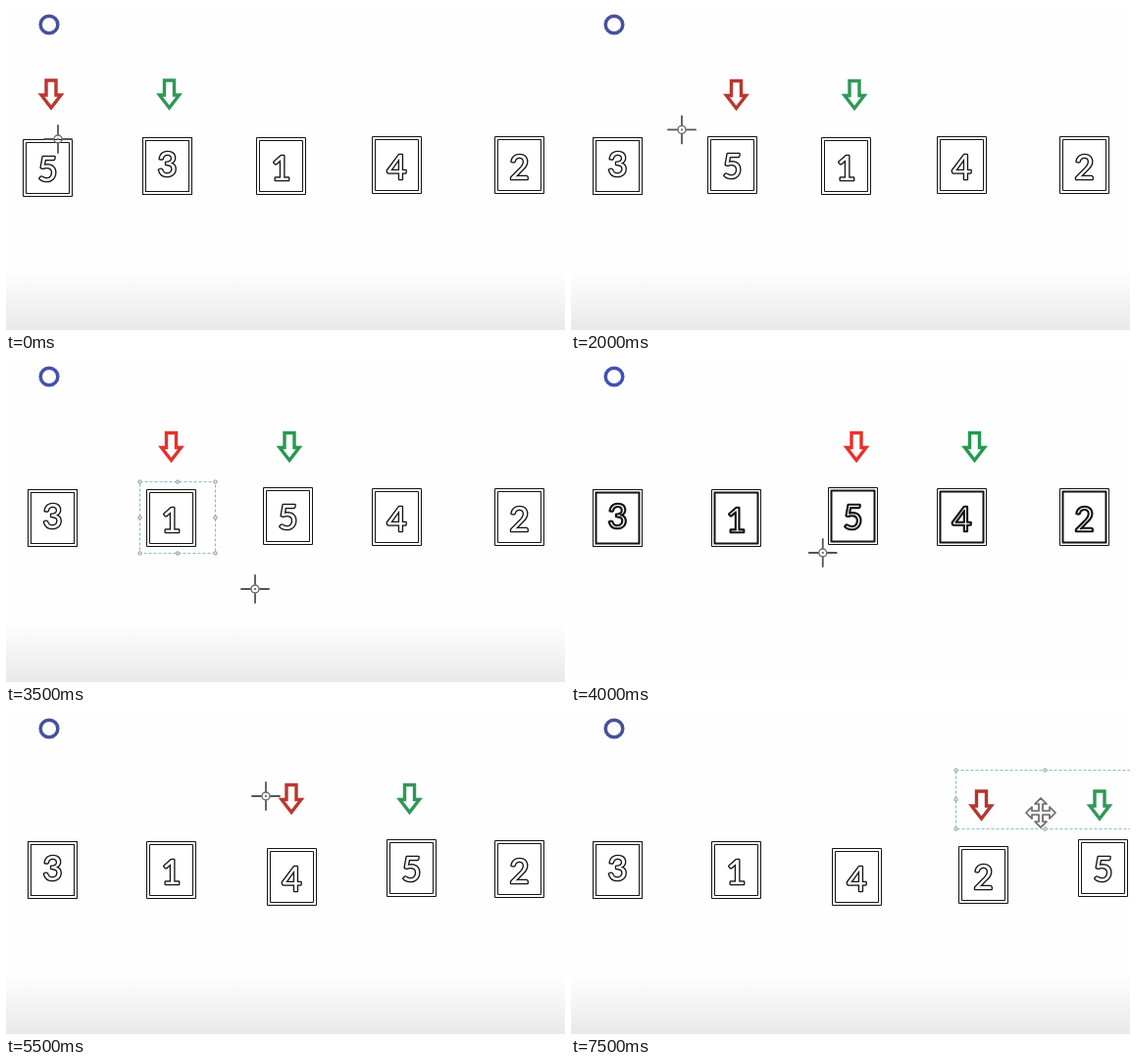
Animation of 570x331 px, one loop 8000 ms. Source, as an HTML page with a canvas:

```html
<!DOCTYPE html>
<html lang="en">
<head>
<meta charset="utf-8">
<title>Sorting cards</title>
<style>
html, body { margin: 0; width: 100%; height: 100%; overflow: hidden; background: #fefefe; }
canvas { display: block; width: 570px; height: 331px; }
</style>
</head>
<body>
<canvas id="stage" width="570" height="331"></canvas>
<script>
const ctx = document.getElementById('stage').getContext('2d');
const STEP = 500, PHASES = 4;
const W = 51, H = 59;

// One pass: lift a card, slide the 5 over, drop the card, move the arrows on
const passes = [
  { digit: '3', dy: 27.5, home: [139, 134], lift: [61, 250], rest: [22, 134], arrow: [46, 0] },
  { digit: '1', dy: 31.5, home: [255, 134], lift: [169, 255], rest: [143, 134], arrow: [168.5, 0.5], keeps: 'card' },
  { digit: '4', dy: 31.5, home: [373, 133], lift: [315, 240], rest: [266, 141], arrow: [291, 0.5] },
  { digit: '2', dy: 31.5, home: [498, 133], lift: [430, 241], rest: [395, 139], arrow: [418.5, 7], keeps: 'arrows' }
];
const STEPS = passes.length * PHASES;
const fiveStops = [[17, 136], [139, 133], [262, 132], [388, 132], [517, 132]];

// Key points: [step, ...values]
const crossPath = [[0, 53, 136], [5, 128, 124], [7, 254, 236], [11, 265, 88], [15, 479, 105]];
const vividness = [[0, 0.5], [2, 0], [5, 0.75], [9, 1], [11, 0.5], [15, 0.4]];

function between(keys, step) {
  const n = Math.max(1, keys.findIndex(k => k[0] >= step));
  const [a, ...from] = keys[n - 1], [b, ...to] = keys[n];
  return from.map((v, i) => v + (to[i] - v) * (step - a) / (b - a));
}

const mix = (dull, bright, t) => `rgb(${dull.map((v, i) => v + (bright[i] - v) * t)})`;

function poly(points, x, y) {
  ctx.beginPath();
  points.forEach(([px, py]) => ctx.lineTo(x + px, y + py));
  ctx.closePath();
}

function ring(x, y, r, width, color) {
  ctx.beginPath();
  ctx.arc(x, y, r, 0, Math.PI * 2);
  ctx.lineWidth = width;
  ctx.strokeStyle = color;
  ctx.stroke();
}

function drawBackground(plain) {
  ctx.fillStyle = '#fefefe';
  if (!plain) {
    const g = ctx.createLinearGradient(0, 270, 0, 331);
    g.addColorStop(0, '#fefefe');
    g.addColorStop(0.4, '#f6f6f6');
    g.addColorStop(1, '#e9e9e9');
    ctx.fillStyle = g;
  }
  ctx.fillRect(0, 0, 570, 331);
}

function drawCard(digit, dy, [x, y], heavy) {
  ctx.fillStyle = '#fff';
  ctx.fillRect(x, y, W, H);
  ctx.strokeStyle = '#151515';
  ctx.lineWidth = 1;
  ctx.strokeRect(x + 0.5, y + 0.5, W - 1, H - 1);
  ctx.lineWidth = heavy ? 2 : 1;
  ctx.strokeRect(x + 3.5, y + 3.5, W - 7, H - 7);

  const cx = x + W / 2, base = y + dy + 12.5;
  ctx.font = '34.5px Lato, Arial, sans-serif';
  ctx.textAlign = 'center';
  ctx.lineJoin = 'round';
  ctx.lineWidth = 2.7;
  ctx.strokeText(digit, cx, base);
  ctx.fillStyle = '#fff';
  ctx.fillText(digit, cx, base);
  if (heavy) {
    ctx.lineWidth = 1.6;
    ctx.strokeText(digit, cx, base);
  }
}

const arrowShape = [[-5, 76], [5, 76], [5, 91], [10, 91], [0, 104], [-10, 91], [-5, 91]];

function drawArrow(x, y, color) {
  poly(arrowShape, x, y);
  ctx.fillStyle = '#fff';
  ctx.fill();
  ctx.lineJoin = 'miter';
  ctx.lineWidth = 3.4;
  ctx.strokeStyle = color;
  ctx.stroke();
}

function drawSelection(x, y, w, h) {
  ctx.strokeStyle = '#8dbbd4';
  ctx.lineWidth = 1.2;
  ctx.setLineDash([3, 2]);
  ctx.strokeRect(x + 0.5, y + 0.5, w, h);
  ctx.setLineDash([]);
  for (let i = 0; i < 9; i++) {
    if (i === 4) continue;
    const hx = x + 0.5 + w * (i % 3) / 2, hy = y + 0.5 + h * Math.floor(i / 3) / 2;
    ctx.fillStyle = '#eee';
    ctx.fillRect(hx - 1.5, hy - 1.5, 3, 3);
    ring(hx, hy, 1.7, 1, '#8a949b');
  }
}

// Both pointers repeat one arm at four quarter turns
const quarterTurns = arm => [0, 1, 2, 3].map(n => {
  const c = [1, 0, -1, 0][n], s = [0, -1, 0, 1][n];
  return arm.map(([x, y]) => [x * c - y * s, x * s + y * c]);
});
const crossArms = quarterTurns([[0, -5], [0, -14]]);
const moveShape = quarterTurns([[2, -2], [2, -9], [6, -9], [0, -15], [-6, -9], [-2, -9]]).flat();

function drawCross(x, y) {
  ctx.strokeStyle = '#555';
  ctx.lineWidth = 1.8;
  for (const arm of crossArms) {
    poly(arm, x, y);
    ctx.stroke();
  }
  ring(x, y, 4, 1.4, '#666');
  ctx.fillStyle = '#777';
  ctx.fillRect(x - 1, y - 1, 2, 2);
}

function drawMove(x, y) {
  poly(moveShape, x, y);
  ctx.fillStyle = '#f4f4f4';
  ctx.fill();
  ctx.lineJoin = 'round';
  ctx.lineWidth = 1.7;
  ctx.strokeStyle = '#686868';
  ctx.stroke();
}

function cardSpot(pass, step) {
  if (step <= 0) return pass.home;
  return step < 3 ? pass.lift : pass.rest;
}

function draw(step) {
  const pass = passes[Math.floor(step / PHASES)], phase = step % PHASES;
  const [vivid] = between(vividness, step);
  const heavy = vivid > 0.9;
  const five = fiveStops[Math.floor((step + 2) / PHASES)];
  const [ax, ay] = pass.arrow;
  const keeps = phase === 3 && pass.keeps;

  drawBackground(heavy);
  ring(44, 19, 8.8, 3.5, mix([75, 80, 131], [65, 81, 183], vivid));
  drawArrow(ax, ay, mix([141, 57, 54], [237, 50, 41], vivid));
  drawArrow(ax + 120.5, ay, mix([56, 149, 100], [35, 154, 76], vivid));
  passes.forEach((p, i) => drawCard(p.digit, p.dy, cardSpot(p, step - i * PHASES), heavy));
  drawCard('5', 30, five, heavy);

  const [lx, ly] = pass.lift, [rx, ry] = pass.rest;
  if (phase === 1) drawSelection(lx - 9, ly - 13, 76, 92);
  if (keeps === 'card') drawSelection(rx - 7, ry - 8, 77, 73);
  if (keeps === 'arrows') drawSelection(ax - 26.5, ay + 54, 182, 60);

  const [px, py] = between(crossPath, step);
  if (phase === 2) drawMove(five[0] + 52, five[1] + 50);
  else if (phase === 1 && !pass.keeps) drawMove(lx + 51, ly + 41);
  else if (keeps === 'arrows') drawMove(px, py);
  else drawCross(px, py);
}

const start = performance.now();
function loop() {
  draw(Math.floor((performance.now() - start) / STEP) % STEPS);
  requestAnimationFrame(loop);
}
loop();
</script>
</body>
</html>
```
